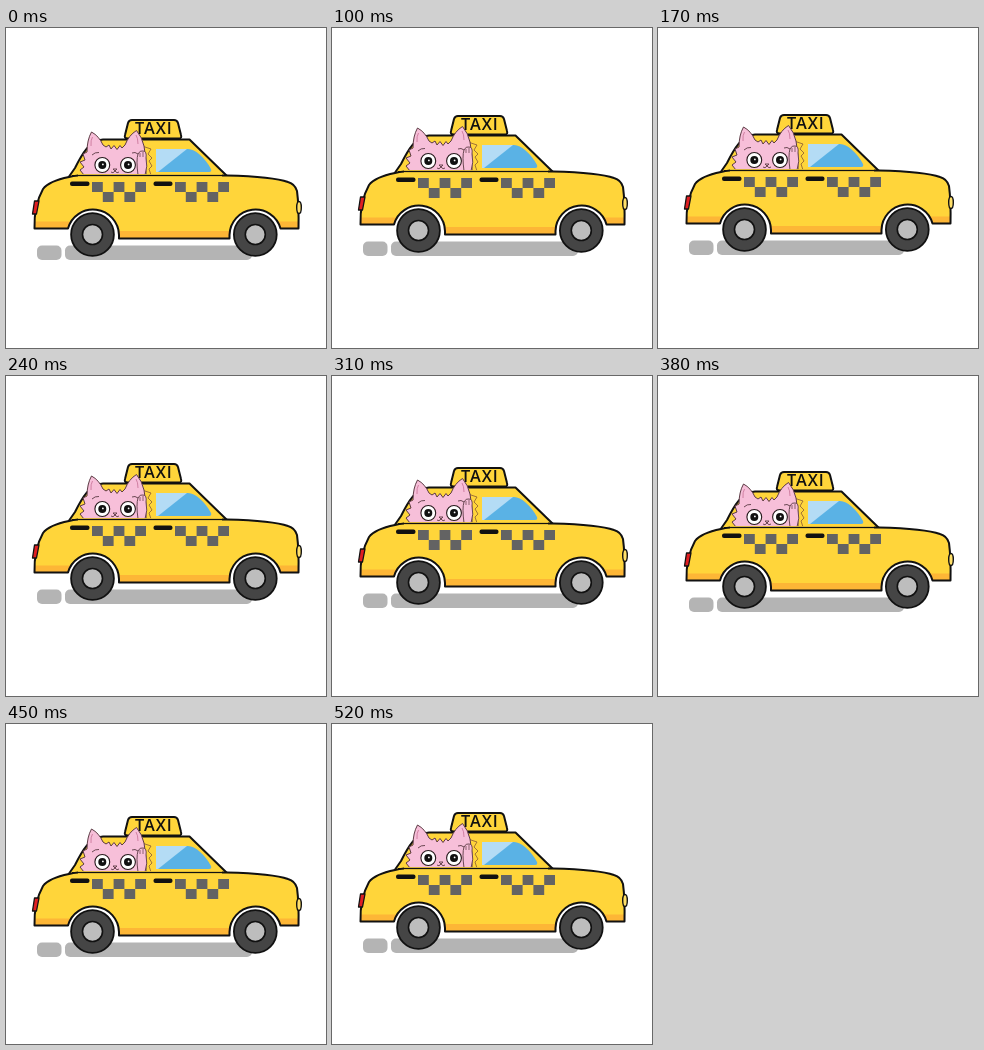
These frames come from a looping animation (320 by 320 pixels, 590 ms). An HTML page with a canvas:

```html
<!DOCTYPE html>
<html lang="en">
<head>
<meta charset="utf-8">
<title>Taxi</title>
<style>
html, body { margin: 0; width: 100%; height: 100%; overflow: hidden; background: #fff; }
canvas { display: block; width: 320px; height: 320px; }
</style>
</head>
<body>
<canvas id="stage"></canvas>
<script>
const canvas = document.getElementById('stage');
const ratio = window.devicePixelRatio || 1;
canvas.width = canvas.height = 320 * ratio;
const ctx = canvas.getContext('2d');

const INK = '#111', YELLOW = '#ffd53a', ORANGE = '#fdb636', GRAY = '#b4b4b4';
const PINK = '#f7bfd9', BLUE = '#5ab2e5', PALE = '#b4dcf5', CHECK = '#636363';
const FUR_LINE = '#5c3a44';

// The car rises over a bump, sinks into its springs and rebounds.
const LOOP = 590, HOLD = 100, STEP = 70;
const BOUNCE = [0, -4, -5, -4, 0, 4, 1, -3];

function bounceAt(ms) {
  const t = ms % LOOP;
  return BOUNCE[t < HOLD ? 0 : 1 + Math.floor((t - HOLD) / STEP)];
}

function paint(path, fill, stroke, width = 2) {
  if (fill) { ctx.fillStyle = fill; ctx.fill(path); }
  if (stroke) { ctx.strokeStyle = stroke; ctx.lineWidth = width; ctx.stroke(path); }
}

function shape(d, fill, stroke, width) {
  paint(new Path2D(d), fill, stroke, width);
}

function disc(x, y, rx, ry, fill, stroke, width) {
  const p = new Path2D();
  p.ellipse(x, y, rx, ry, 0, 0, Math.PI * 2);
  paint(p, fill, stroke, width);
}

function box(x, y, w, h, r, fill, stroke, width) {
  const p = new Path2D();
  p.roundRect(x, y, w, h, r);
  paint(p, fill, stroke, width);
}

const cabin = 'M62 150 L69 140 C76 126 84 112 97 111.5 H183.5 L221 148 V150 Z';
const body = new Path2D(
  'M28.5 200.5 C28 183 32 170 37 161 Q43 153 63 149 Q67 148 72 147.5 H221 ' +
  'C240 148 268 149 282 154 Q289 156 291 163 Q293 178 292.5 200.5 H274.5 ' +
  'A26 26 0 0 0 223.5 207 V210.5 H113 V207 A26 26 0 0 0 62 200.5 Z');

function drawShadow() {
  box(31, 217.5, 24.5, 14.5, 5, GRAY);
  box(59, 217.5, 187, 14.5, 5, GRAY);
}

function drawSign() {
  shape('M126 92 H168 Q171 92 172 95 L175 107 Q176 110.5 173 110.5 H121.5 Q118 110.5 119 107 L122 95 Q123 92 126 92 Z',
    YELLOW, INK, 2);
  ctx.fillStyle = INK;
  ctx.font = '600 16.3px "Open Sans", sans-serif';
  ctx.textAlign = 'center';
  ctx.letterSpacing = '0.9px';
  ctx.fillText('TAXI', 147.8, 106);
}

function drawWindow() {
  const glass = new Path2D('M150 121 H182 Q188 121.5 193 126 Q201 133 205 141 Q206 144 203 144 H150 Z');
  paint(glass, BLUE);
  ctx.save();
  ctx.clip(glass);
  shape('M150 121 H181 L152 144 H150 Z', PALE);
  ctx.restore();
}

function drawEye(x) {
  disc(x, 137, 7.4, 7.5, '#fff', '#27191c', 1.1);
  disc(x, 137, 4, 4.1, INK);
  disc(x + .6, 136.4, .9, .9, '#fff');
}

function drawCat() {
  // Fur at the side, behind the head.
  shape('M136 118 L145 121 L142 126 L146 130 L143 133 L146 138 L143 141 L145 147 H136 Z', YELLOW, '#8a5a35', .8);
  shape('M78 147 L74 142 L78 139 L74 134 L79 132 L77 126 L81 124 Q81 112 85.5 104 Q93 108 97 117 ' +
    'L100 119 L103 117 L105 121 L108 117.5 L111 121.5 L114 117.5 L116 120 L119 117 Q123 107 130.5 102.5 ' +
    'Q136 109 138 118 Q141 132 140 147 Z', PINK, FUR_LINE, 1);
  shape('M85 118 Q84.5 112 86.5 109 M132 116 Q132 110 130 107', null, '#d07fa2', 1);
  shape('M86 127 Q89 124 93 124.5 M126 125 Q129 123.5 132 126', null, FUR_LINE, .9);
  drawEye(96.3);
  drawEye(122);
  shape('M107 141 H111 L109 143 Z M109 143 Q107 146 105 144 M109 143 Q111 146 113 144', null, FUR_LINE, .9);
  shape('M132 147 Q130 132 132 126 Q134 122 137 123 Q141 123 140 130 Q142 138 139 147 Z', PINK, FUR_LINE, .9);
  shape('M134 125 V129 M137 124 V129', null, FUR_LINE, .7);
}

function drawChecks(x) {
  ctx.fillStyle = CHECK;
  for (let i = 0; i < 5; i++) ctx.fillRect(x + i * 10.8, 154 + (i % 2) * 10, 10.8, 10);
}

function drawBody() {
  paint(body, YELLOW);
  ctx.save();
  ctx.clip(body);
  ctx.fillStyle = ORANGE;
  ctx.fillRect(26, 193.5, 40, 9);
  ctx.fillRect(270, 193.5, 27, 9);
  ctx.fillRect(105, 203, 125, 9);
  ctx.restore();
  paint(body, null, INK, 2);
  // Thin the seam between cabin and body.
  shape('M72 147.5 H216', null, YELLOW, 2.4);
  shape('M66 147.5 H219', null, INK, 1);
  drawChecks(86);
  drawChecks(169);
  box(64, 153.5, 19.5, 4.5, 2, INK);
  box(147.5, 153.5, 19, 4.5, 2, INK);
  shape('M28.5 173 H33 L30.5 186 H26.5 Z', '#e01f22', INK, 1.3);
  disc(293, 179.5, 2.3, 6, '#ffe06a', INK, 1.4);
}

function drawWheel(x) {
  disc(x, 206.5, 21.4, 21.4, '#454545', INK, 1.8);
  disc(x, 206.5, 10, 10, '#bdbdbd', INK, 1.6);
}

function draw(ms) {
  ctx.setTransform(ratio, 0, 0, ratio, 0, 0);
  ctx.fillStyle = '#fff';
  ctx.fillRect(0, 0, 320, 320);
  ctx.lineJoin = 'round';
  ctx.translate(0, bounceAt(ms));
  drawShadow();
  shape(cabin, YELLOW, INK, 2);
  drawSign();
  drawWindow();
  drawCat();
  drawBody();
  drawWheel(86.5);
  drawWheel(249.3);
}

let start;
function tick(now) {
  start ??= now;
  draw(Math.max(0, now - start));
  requestAnimationFrame(tick);
}
draw(0);
requestAnimationFrame(tick);
</script>
</body>
</html>
```
